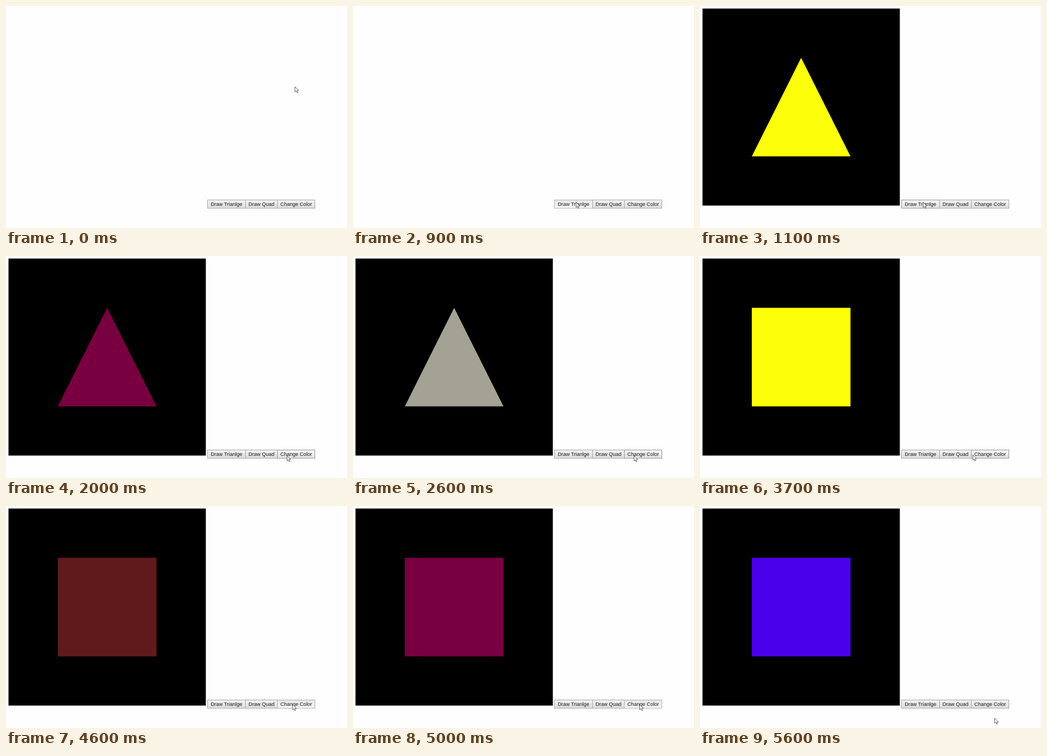
An HTML page for the animation above (6100 ms loop, 600 px wide and 392 px high).

```html
<!DOCTYPE html>
<html lang="en">
<head>
<meta charset="utf-8">
<title>Shape buttons</title>
<style>
  html, body { margin: 0; width: 100%; height: 100%; overflow: hidden; background: #fefdff; }
  svg { display: block; }
  text { font: 9px Arial, "Liberation Sans", sans-serif; text-anchor: middle; fill: #1a1a1a; }
  .button rect { fill: url(#idle); stroke: #a9a9a9; }
  .hover rect { fill: url(#lit); stroke: #989898; }
  .pressed rect { fill: url(#down); stroke: #b4b4b4; }
</style>
</head>
<body>
<svg width="600" height="392" viewBox="0 0 600 392">
  <defs>
    <linearGradient id="idle" x2="0" y2="1"><stop stop-color="#f3f3f3"/><stop offset="1" stop-color="#dcdcdc"/></linearGradient>
    <linearGradient id="lit" x2="0" y2="1"><stop stop-color="#f6f6f6"/><stop offset="1" stop-color="#e0e0e0"/></linearGradient>
    <linearGradient id="down" x2="0" y2="1"><stop stop-color="#e6e6e6"/><stop offset="1" stop-color="#f6f6f6"/></linearGradient>
  </defs>
  <g id="view">
    <rect x="4.4" y="4.5" width="347.2" height="347.9"/>
    <path id="shape"/>
  </g>
  <g id="buttons"></g>
  <path id="cursor" d="M.5 .5V9.8L2.6 7.9 4.1 11.3 5.6 10.6 4.1 7.3H7Z" fill="#fff" stroke="#444" stroke-width=".8"/>
</svg>
<script>
const LOOP = 6100, STEP = 100;
const YELLOW = '#fdff0a', PALETTE = ['#a3a293', '#780040', '#4b00eb', '#611a1c'];
const TRIANGLE = 'M178 91.5L264.8 265.5H91.2Z', QUAD = 'M91.2 91.5H264.8V265.4H91.2Z';
const $ = id => document.getElementById(id);

const smooth = p => p * p * (3 - 2 * p);
const mix = (a, b, k) => a + (b - a) * k;

// The pointer eases from stop to stop; the first move swings out to the right.
const home = { x: 508, y: 142 };
const moves = [
  { from: 0, to: 750, x: 392, y: 346, bend: { x: 662, y: 200 } },
  { from: 1100, to: 1600, x: 494, y: 352 },
  { from: 3000, to: 3300, x: 471, y: 351 },
  { from: 3500, to: 4100, x: 504, y: 350 },
  { from: 5200, to: 5600, x: 518, y: 374 }
];

function pointerAt(t) {
  let at = home;
  for (const m of moves.filter(m => m.from < t)) {
    const k = smooth(Math.min(1, (t - m.from) / (m.to - m.from)));
    const bend = m.bend || { x: (at.x + m.x) / 2, y: (at.y + m.y) / 2 };
    const along = axis => mix(mix(at[axis], bend[axis], k), mix(bend[axis], m[axis], k), k);
    at = { x: along('x'), y: along('y') };
  }
  return at;
}

// Drawing a shape resets it to yellow; each colour click takes the next palette entry.
const clicks = [];
const clickDraw = (time, path) => clicks.push({ time, path, fill: YELLOW });
let colour = 0;
function clickColour(first, count, path) {
  for (let i = 0; i < count; i++)
    clicks.push({ time: first + 200 * i, path, fill: PALETTE[colour++ % PALETTE.length] });
}
clickDraw(1000, TRIANGLE);
clickColour(1800, 7, TRIANGLE);
clickDraw(3500, QUAD);
clickColour(4400, 1, QUAD);
clickColour(4700, 3, QUAD);

let left = 354.5;
const buttons = [['Draw Trianlge', 67], ['Draw Quad', 56], ['Change Color', 66]].map(([label, width]) => {
  $('buttons').insertAdjacentHTML('beforeend',
    `<g><rect x="${left}" y="342.5" width="${width}" height="14.6"/>
     <text x="${left + width / 2}" y="352.7">${label}</text></g>`);
  const button = { node: $('buttons').lastElementChild, left, right: left + width };
  left += width;
  return button;
});

function draw(now) {
  const t = Math.floor(now % LOOP / STEP) * STEP;
  const { x, y } = pointerAt(t);
  $('cursor').setAttribute('transform', `translate(${x} ${y})`);

  const scene = clicks.filter(c => c.time <= t).pop();
  $('view').style.display = scene ? '' : 'none';
  if (scene) {
    $('shape').setAttribute('d', scene.path);
    $('shape').setAttribute('fill', scene.fill);
  }

  const pressed = clicks.some(c => c.time === t + STEP);
  for (const b of buttons) {
    const over = x >= b.left && x < b.right && y >= 342.5 && y < 357;
    b.node.setAttribute('class', 'button ' + (over ? pressed ? 'pressed' : 'hover' : ''));
  }
  requestAnimationFrame(draw);
}
requestAnimationFrame(draw);
</script>
</body>
</html>
```
